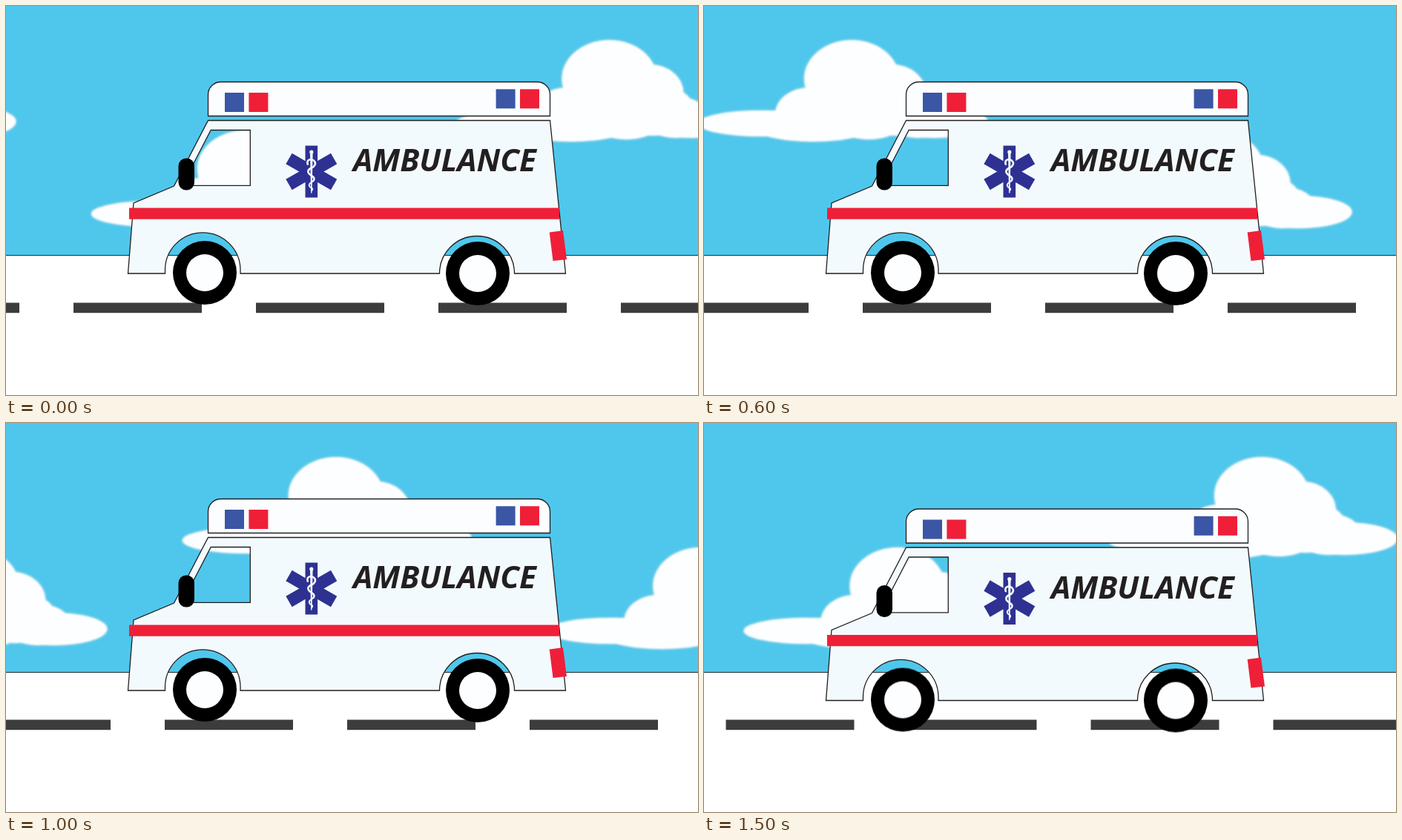
An HTML page that plays this animation: 933x525 px, repeating every 1.6 s.

```html
<!DOCTYPE html>
<html lang="en">
<head>
<meta charset="utf-8">
<title>Ambulance</title>
<style>
  html, body { margin: 0; width: 100%; height: 100%; overflow: hidden; background: #fff; }
  svg { display: block; width: 933px; height: 525px; }

  .sky { fill: #4fc7ec; }
  .cloud { fill: #fdfeff; filter: drop-shadow(0 0 1.5px #d5dade) blur(.8px); }
  .dash { fill: #3c3c3d; }
  .line { stroke: #231f20; stroke-width: 1.3; }
  .red { fill: #ef1f38; }
  .blue { fill: #3a56a5; }
  .star { fill: #2e3192; }
  .snake { fill: none; stroke: #f3fafd; stroke-linecap: round; stroke-linejoin: round; }
  .sign { font: italic 700 42px "Open Sans", "Noto Sans", sans-serif; fill: #231f20; }

  /* everything advances in 100 ms ticks */
  #clouds { animation: drift 1600ms steps(16) infinite; }
  #road { animation: roll 400ms steps(4) infinite; }
  #van { animation: bounce 200ms steps(2) infinite; }
  @keyframes drift { from { transform: translateX(0); } to { transform: translateX(983px); } }
  @keyframes roll { from { transform: translateX(0); } to { transform: translateX(246px); } }
  @keyframes bounce { from { transform: translateY(0); } to { transform: translateY(27px); } }
</style>
</head>
<body>
<svg viewBox="0 0 933 525">
  <defs>
    <g id="cloud" class="cloud">
      <ellipse cx="322" cy="98" rx="64" ry="52"/>
      <ellipse cx="377" cy="118" rx="45" ry="39"/>
      <ellipse cx="381" cy="140" rx="55" ry="35"/>
      <ellipse cx="411" cy="150" rx="45" ry="28"/>
      <ellipse cx="433" cy="156" rx="72" ry="22"/>
      <ellipse cx="345" cy="158" rx="45" ry="22"/>
      <ellipse cx="270" cy="160" rx="85" ry="23"/>
      <ellipse cx="265" cy="146" rx="46" ry="36"/>
      <ellipse cx="200" cy="158.5" rx="85" ry="17.5"/>
    </g>
    <g id="lamps">
      <rect class="blue" width="26" height="26"/>
      <rect class="red" x="32.4" width="26" height="26"/>
    </g>
    <g id="wheel">
      <circle r="43"/>
      <circle r="25" fill="#fdfeff"/>
    </g>
    <rect id="arm" class="star" x="-8.3" y="-35" width="16.6" height="70"/>
    <rect id="dash" class="dash" y="400.5" width="173" height="13.7"/>
  </defs>

  <rect class="sky" width="933" height="336"/>
  <g id="clouds">
    <use href="#cloud" x="-491.5"/>
    <use href="#cloud" x="491.5"/>
    <use href="#cloud" x="-983" y="122"/>
    <use href="#cloud" y="122"/>
  </g>
  <rect y="336" width="933" height="189" fill="#fff"/>
  <rect y="336" width="933" height="1" fill="#1c2a30"/>

  <g id="road">
    <use href="#dash" x="-401"/>
    <use href="#dash" x="-155"/>
    <use href="#dash" x="91"/>
    <use href="#dash" x="337"/>
    <use href="#dash" x="583"/>
    <use href="#dash" x="829"/>
  </g>

  <g id="van">
    <path class="line" fill="#fbfdfe" d="M272.5 148.5V119.5a17 17 0 0 1 17-17H716.5a17 17 0 0 1 17 17V148.5Z"/>
    <use href="#lamps" x="295" y="117"/>
    <use href="#lamps" x="660.6" y="112.3"/>

    <!-- body with a see-through window -->
    <path class="line" fill="#f3fafd" fill-rule="evenodd" d="M272.5 154.5H733.5L754.5 361H685.5
      A50.5 50.5 0 0 0 584.5 361H316V356.5A50.7 50.7 0 0 0 214.5 356.5V361H164.5L172 266L226.5 243Z
      M276.2 167.5H329.3V242.3H237.5Z"/>
    <rect x="232.5" y="205.5" width="21.5" height="43" rx="10.5"/>
    <rect class="red" x="166" y="272.5" width="580" height="15.2"/>
    <path class="red" d="M732.7 305.5L751 303L756 342L737.5 344Z"/>

    <g transform="translate(411.8 223.5)">
      <use href="#arm"/>
      <use href="#arm" transform="rotate(60)"/>
      <use href="#arm" transform="rotate(-60)"/>
      <circle cy="-26.5" r="2.6" fill="#f3fafd"/>
      <path fill="#f3fafd" d="M-1.8-25H1.8L.7 29H-.7Z"/>
      <path class="snake" stroke-width="2.6" d="M-5-10C-7-16-1-18 3-15S5-7 0-5S-6 1-2 4S5 8 3 12"/>
      <path class="snake" stroke-width="1.8" d="M3 12C1 15-4 15-3 19S3 21 1 25"/>
    </g>
    <text class="sign" x="468" y="223.3">AMBULANCE</text>

    <use href="#wheel" x="268" y="360"/>
    <use href="#wheel" x="636" y="361"/>
  </g>
</svg>
</body>
</html>
```
